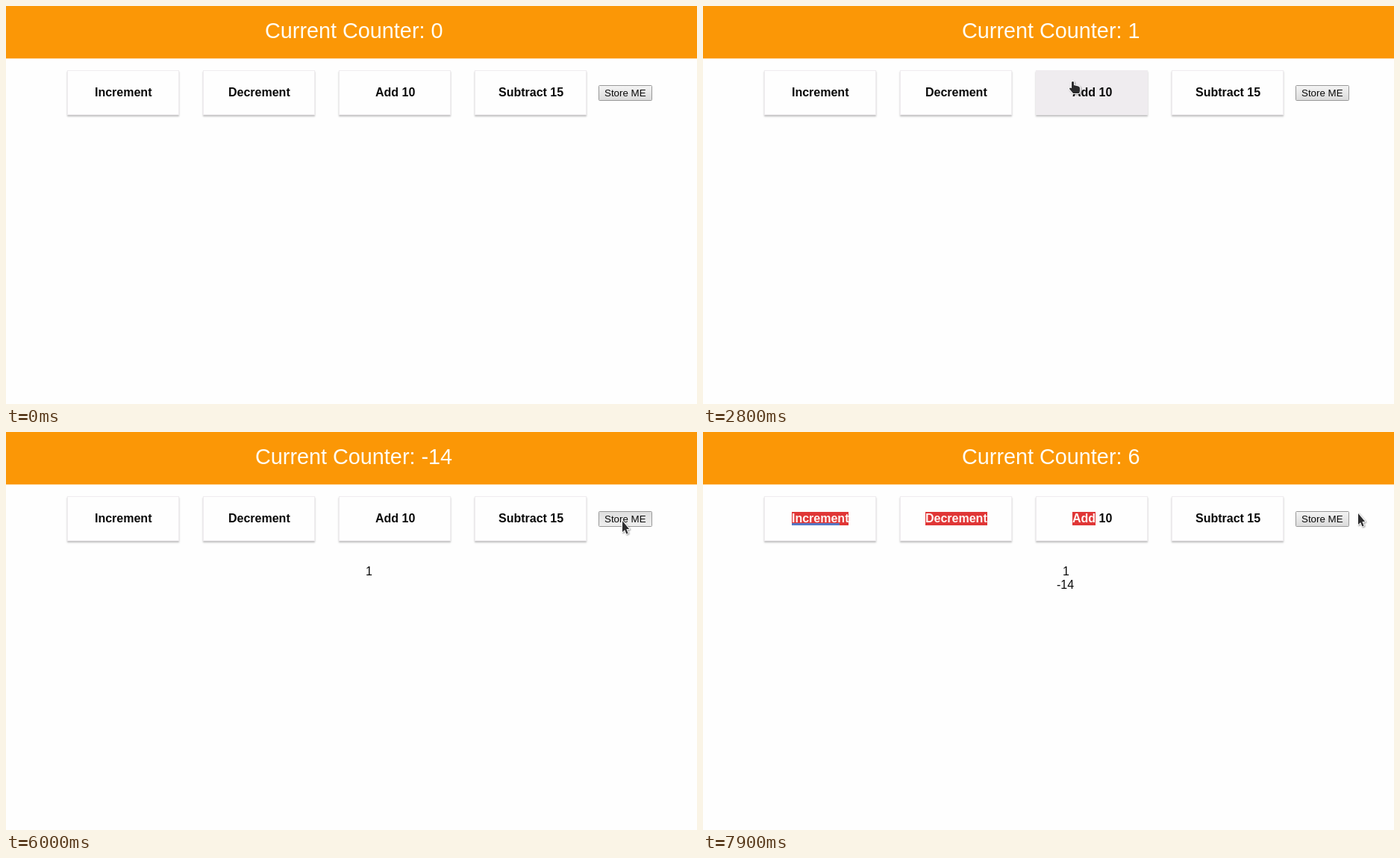
These frames come from a looping animation (926 px wide and 533 px high, 8000 ms). An HTML page with a canvas:

```html
<!DOCTYPE html>
<html lang="en">
<head>
<meta charset="utf-8">
<title>Counter</title>
<style>
  html, body { margin: 0; width: 100%; height: 100%; overflow: hidden; background: #fefefe; }
  canvas { display: block; }
</style>
</head>
<body>
<canvas id="stage" width="926" height="533"></canvas>
<script>
const ctx = document.getElementById('stage').getContext('2d');
const LOOP = 8000, TICK = 100, PRESS = 200, DOUBLE_CLICK = 300;
const PAPER = '#fefefe', HOVER = '#efecef', INK = '#0a0a0a';

const addends = { 'Increment': 1, 'Decrement': -1, 'Add 10': 10, 'Subtract 15': -15 };
const cards = Object.entries(addends).map(([label, amount], i) =>
  ({ label, amount, x: 82 + 182 * i, y: 86, w: 150, h: 60, reach: 15 }));
const button = { x: 794, y: 106, w: 72, h: 21, reach: 0 };

// What a click does depends on the widget under the pointer
const clicks = [1100, 1700, 2600, 4200, 5300, 6000, 7200, 7400];
const entry = { at: 400, x: 150, y: 24 };
const moves = [
  { at: 400, ms: 300, x: 190, y: 128 },
  { at: 1800, ms: 400, x: 325, y: 124 },
  { at: 2700, ms: 100, x: 495, y: 101 },
  { at: 2800, ms: 100, x: 620, y: 74 },
  { at: 2900, ms: 300, x: 838, y: 145 },
  { at: 3400, ms: 600, x: 826, y: 118 },
  { at: 4600, ms: 400, x: 686, y: 90 },
  { at: 5400, ms: 200, x: 826, y: 118 },
  { at: 6200, ms: 700, x: 504, y: 95 },
  { at: 7500, ms: 400, x: 878, y: 108 },
];

const hand = new Path2D('M-1 1Q.5-1 2 1V5L8 6.5Q10 7 10 9V13L9 16H1L-4 10Q-4 7.5-1.5 9L-1 9Z');
const arrow = new Path2D('M0 1V16L3.2 13L5.4 18.4L7.6 17.4L5.4 12H9.2Z');

function pointerAt(t) {
  if (t < entry.at) return null;
  let { x, y } = entry;
  for (const move of moves) {
    const k = Math.min(1, Math.max(0, (t - move.at) / move.ms));
    x += (move.x - x) * k;
    y += (move.y - y) * k;
  }
  return { x: Math.round(x), y: Math.round(y) };
}

function widgetAt(p) {
  return p && [...cards, button].find(({ x, y, w, h, reach }) =>
    p.x >= x && p.x < x + w + reach && p.y >= y && p.y < y + h);
}

// Replays every click up to time t
function stateAt(t) {
  const state = { count: 0, stored: [], pressed: false, selectedTo: -1, selectedAt: 0 };
  clicks.filter(at => at <= t).forEach((at, i) => {
    const widget = widgetAt(pointerAt(at));
    if (widget === button) {
      state.pressed = t < at + PRESS;
      if (!state.pressed) state.stored.push(state.count);
      return;
    }
    state.count += widget.amount;
    if (at - clicks[i - 1] < DOUBLE_CLICK) {
      state.selectedTo = cards.indexOf(widget);
      state.selectedAt = at;
    }
  });
  return state;
}

function rect(x, y, w, h, color) {
  ctx.fillStyle = color;
  ctx.fillRect(x, y, w, h);
}

function setFont(font) {
  ctx.font = `${font} "Liberation Sans", Arial, sans-serif`;
}

function text(str, x, y, color) {
  ctx.fillStyle = color;
  ctx.fillText(str, x, y);
}

// Whole-pixel left edge of a centred text in the current font
function leftOf(str, center) {
  return Math.round(center - ctx.measureText(str).width / 2);
}

function centered(str, center, y, font, color) {
  setFont(font);
  text(str, leftOf(str, center), y, color);
}

function shadow(color, dx, dy, blur) {
  ctx.shadowColor = color;
  ctx.shadowOffsetX = dx;
  ctx.shadowOffsetY = dy;
  ctx.shadowBlur = blur;
}

function drawCard({ x, y, w, h, label }, hovered, selected) {
  ctx.save();
  shadow('rgba(0,0,0,.24)', 0, 2, 2);
  rect(x, y, w, h, HOVER);
  ctx.restore();
  if (!hovered) rect(x + 1, y + 1, w - 2, h - 2, PAPER);

  setFont('bold 16px');
  const left = leftOf(label, x + w / 2 + .5);
  const word = selected ? label.split(' ')[0] : '';
  const width = ctx.measureText(word).width;
  rect(left, 107, Math.round(width), 18, '#e03636');
  text(word, left, 121, '#fff4f2');
  text(label.slice(word.length), left + width, 121, INK);
}

function drawButton({ x, y, w, h }, hovered, pressed) {
  const [top, bottom] = pressed ? ['#dedede', '#f0f0f0'] : hovered ? ['#f9f9f9', '#e3e3e3'] : ['#f5f5f5', '#dadada'];
  const fill = ctx.createLinearGradient(0, y, 0, y + h);
  fill.addColorStop(0, top);
  fill.addColorStop(1, bottom);
  ctx.fillStyle = fill;
  ctx.strokeStyle = '#989898';
  ctx.lineWidth = 1;
  ctx.beginPath();
  ctx.roundRect(x + .5, y + .5, w - 1, h - 1, 1);
  ctx.fill();
  ctx.stroke();
  centered('Store ME', x + w / 2, 121, '13.333px', INK);
}

function drawPointer({ x, y }, shape) {
  ctx.save();
  ctx.translate(x, y);
  ctx.lineJoin = 'round';
  ctx.lineWidth = 2;
  ctx.strokeStyle = '#fff';
  ctx.fillStyle = '#2c2c2e';
  shadow('rgba(0,0,0,.4)', 1, 1, 2);
  ctx.stroke(shape);
  shadow('transparent', 0, 0, 0);
  ctx.fill(shape);
  ctx.restore();
}

function draw(t) {
  const pointer = pointerAt(t);
  const target = widgetAt(pointer);
  const { count, stored, pressed, selectedTo, selectedAt } = stateAt(t);

  rect(0, 0, 926, 533, PAPER);
  rect(0, 0, 926, 70.3, '#fb9706');
  centered(`Current Counter: ${count}`, 466, 43, '28.8px', '#fffef5');

  cards.forEach((card, i) => drawCard(card, card === target, i <= selectedTo));
  if (selectedAt) rect(119, 122, 9 + (t - selectedAt) * .11, 3, '#5577c4');
  drawButton(button, target === button, pressed);
  stored.forEach((value, row) => centered(value, 486, 192 + row * 18, '16px', INK));

  if (pointer) drawPointer(pointer, cards.includes(target) ? hand : arrow);
}

function loop(now) {
  draw(Math.floor(now % LOOP / TICK) * TICK);
  requestAnimationFrame(loop);
}
requestAnimationFrame(loop);
</script>
</body>
</html>
```
